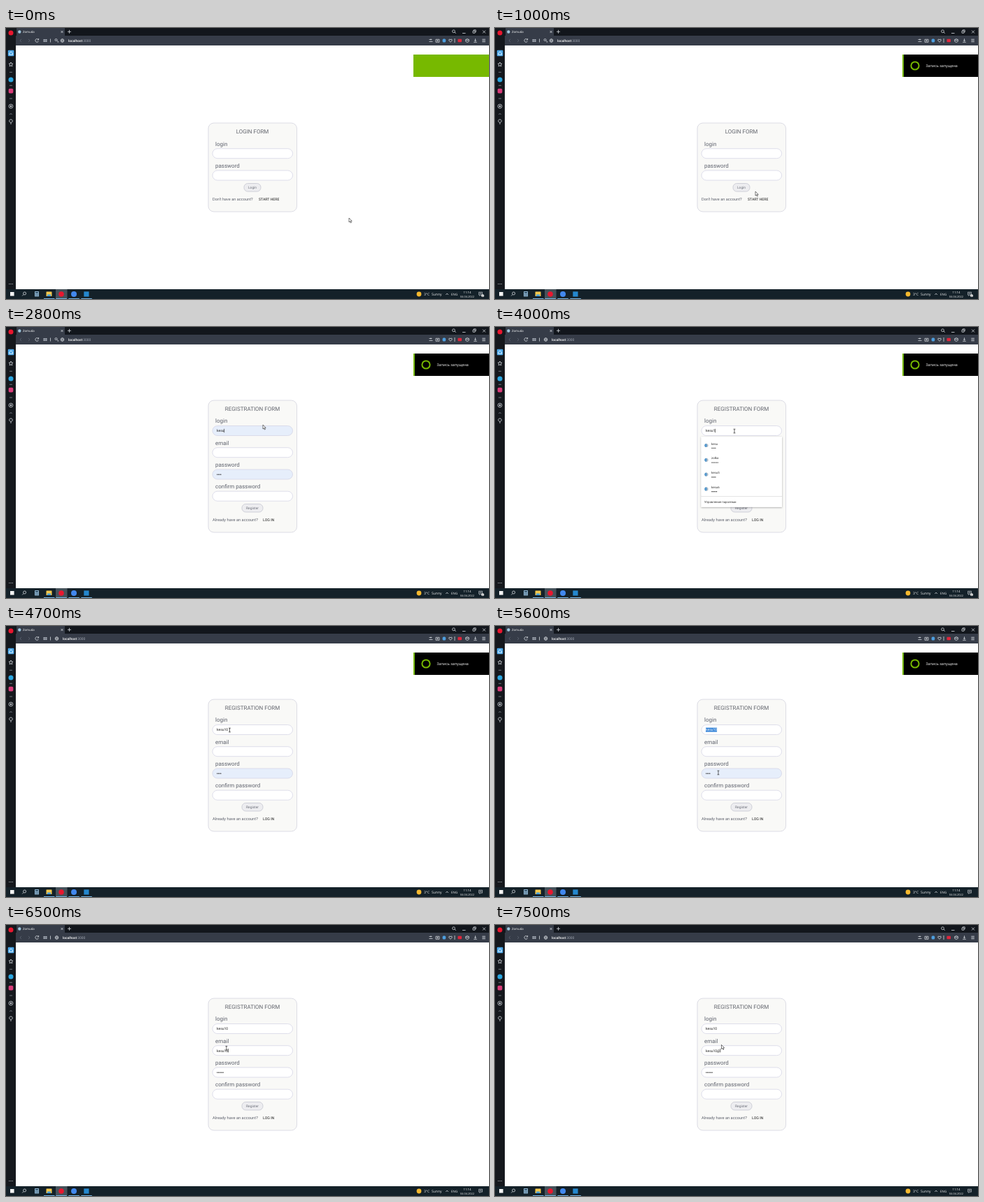
These frames come from a looping animation (690 by 388 pixels, 8000 ms). An HTML page:

```html
<!DOCTYPE html>
<html lang="en">
<head>
<meta charset="utf-8">
<title>Registration walkthrough</title>
<style>
  html, body { margin: 0; width: 100%; height: 100%; overflow: hidden; background: #fff; }
  svg { display: block; width: 690px; height: 388px; }
  text { font-family: Roboto, Arial, sans-serif; text-rendering: geometricPrecision; white-space: pre; }
  .ui { font-family: "Open Sans", "Noto Sans", sans-serif; }
  .line { fill: none; stroke: #d4d8de; stroke-width: .8; }
</style>
</head>
<body>
<svg id="stage" viewBox="0 0 690 388"></svg>
<script>
const LOOP = 8000;
const USER = 'kesu';
const FIELD = { login: 141.5, email: 172.7, password: 204, confirm: 235.2 };

const rect = (x, y, w, h, fill, more = '') =>
  `<rect x="${x}" y="${y}" width="${w}" height="${h}" fill="${fill}" ${more}/>`;
const disc = (x, y, r, fill, more = '') => `<circle cx="${x}" cy="${y}" r="${r}" fill="${fill}" ${more}/>`;
const line = (d, more = '') => `<path class="line" d="${d}" ${more}/>`;
const text = (x, y, size, str, fill = '#5f636e', more = '') =>
  `<text x="${x}" y="${y}" font-size="${size}" fill="${fill}" ${more}>${str}</text>`;
const mid = 'text-anchor="middle"';
const group = (id, body) => `<g id="${id}">${body}</g>`;
const dots = (x, y, n, step = 1.7) =>
  Array.from({ length: n }, (_, i) => disc(x + .8 + i * step, y, .66, '#222')).join('');

const label = (y, str) => text(299, y - 4.2, 8, str);
const input = (y, id = '') =>
  rect(295, y, 114.5, 14, '#fff', `${id && `id="${id}"`} rx="7" stroke="#d2d2e4" stroke-width=".7"`);
const card = (y, h, title) =>
  rect(289, y, 126.5, h, '#f9f9f7', 'rx="8" stroke="#d3d3df" stroke-width=".8"') +
  text(352, y + 15, 8, title, '#63666e', mid);
const button = (y, w, str) =>
  rect(352 - w / 2, y, w, 11.6, '#ededf0', 'rx="5.5" stroke="#bfc0cc" stroke-width=".7"') +
  text(352, y + 7.5, 4.9, str, '#6b6e78', mid);

function browser() {
  return rect(0, 0, 690, 11, '#12161c') + rect(14, 11, 676, 14, '#363c48') +
    rect(0, 0, 14, 374, '#15181d') + rect(15, 0, 69, 12, '#363c48') +
    // tab strip and window buttons
    disc(7, 7, 3.5, '#e8172f') + disc(19.3, 5.5, 2.2, '#9cc6dd') +
    text(24, 7.2, 4.3, 'Zomuda', '#fff', 'class="ui"') +
    line('M78.5 4l3 3m0-3l-3 3M88 5.3h5m-2.5-2.5v5M652 7.5h4.5M667 4.2h3v3h-3zM668.2 4v-1.2h3v3h-1M681 3.5l4 4m0-4l-4 4M641 6l1.8 1.8') +
    disc(639.5, 4.7, 1.9, 'none', 'class="line"') +
    // navigation
    line('M22 15.8l-2 2.2 2 2.2M32 15.8l2 2.2-2 2.2', 'style="stroke:#5f6673"') +
    line('M46.3 16.6a2.4 2.4 0 1 0 .2 2.2M46.6 15v2h-2M63.5 15.5v5') +
    rect(53.5, 16, 5, 4, '#a9afb9') + line('M53.5 18h5M56 16v4', 'style="stroke:#363c48;stroke-width:.5"') +
    group('key', disc(71.5, 17, 1.5, 'none', 'class="line"') + line('M72.6 18l2.4 2.3m-1 .3l1-1')) +
    group('address', disc(80.5, 18, 2.3, 'none', 'class="line"') +
      line('M78.2 18h4.6M80.5 15.7q-2 2.3 0 4.6q2-2.3 0-4.6', 'style="stroke-width:.5"') +
      text(89, 19.7, 4.9, 'localhost<tspan fill="#a3a9b4" font-weight="400">:3000</tspan>', '#fff', 'font-weight="500"')) +
    // toolbar icons
    line('M604.5 16.5h4m-4 3h5m-2.5-4v2M614 16.3h5v4h-5zM641 15v6') + disc(616.5, 18.3, 1, '#d4d8de') +
    rect(623.6, 15.6, 4.6, 4.8, '#4d9fe0', 'rx="1.5"') +
    line('M635 20.3l-2.2-2.3q-.4-2 1.2-2l1 .9 1-.9q1.6 0 1.2 2z') +
    rect(645.5, 15.7, 5.5, 4.6, '#e0263c', 'rx="1"') +
    line('M659 15.5l2.3 1.2v2.6l-2.3 1.2-2.3-1.2v-2.6zm-2.3 1.2l2.3 1.2 2.3-1.2M670.5 15.3v3.5m-1.5-1.3l1.5 1.4 1.5-1.4M668.2 20.3h4.6M680.3 16.2h4.5m-4.5 1.8h4.5m-4.5 1.8h4.5') +
    // side panel
    rect(2.8, 31.7, 8.6, 8.6, '#4aa5e6', 'rx="1"') + line('M4.8 36l2.3-2.2 2.3 2.2v2.3h-4.6z', 'style="stroke:#fff"') +
    line('M7 49l.9 2 2.1.2-1.6 1.5.5 2.2-1.9-1.1-1.9 1.1.5-2.2L4 51.2l2.1-.2z') +
    line('M5 63.3h4M5 82.3h4M5 101h4M5.2 123.6l1.8-1 1.8 1', 'style="stroke:#858b94"') +
    disc(7, 74, 3.5, '#2aa5df') + rect(3.7, 86.8, 6.6, 6.6, '#d83b78', 'rx="1.6"') +
    disc(7, 112, 2.9, 'none', 'class="line"') + disc(7, 112, 1.2, '#d4d8de') +
    line('M6 135.3q-1.6-1.2-1.3-2.6.5-1.8 2.3-1.8t2.3 1.8q.3 1.4-1.3 2.6zM6 137h2') +
    [4.8, 7, 9.2].map(x => disc(x, 366.5, .6, '#d4d8de')).join('');
}

function taskbar() {
  const w = '#f4f4f4', ui = 'class="ui"';
  return rect(0, 374, 690, 14, '#142129') + rect(71, 374, 16.5, 14, '#46525a') +
    rect(6, 378, 5.6, 5.6, w) +
    disc(26.6, 380, 2, 'none', 'class="line"') + line('M25.2 381.5l-2 2') +
    rect(41, 377, 6, 7.6, '#8fb5d0', 'rx=".6"') + rect(42, 378, 4, 1.6, '#26455b') +
    line('M42 381.3h4m-4 1.8h4', 'style="stroke:#26455b;stroke-dasharray:1 .5"') +
    rect(57.5, 377.4, 8, 6.7, '#f3c84c', 'rx=".5"') + rect(59, 381.5, 5, 2.6, '#4aa1dc') +
    disc(79, 381, 3.8, '#e8172f') + disc(97, 381, 4, '#4288ee') + rect(111.3, 377.4, 7.2, 7.2, '#2488cf') +
    [54, 71.3, 89.3, 107.3].map(x => rect(x, 387, 15.5, 1, '#76b4e3')).join('') +
    disc(590, 381, 3.4, '#f5b82e') +
    text(597, 383, 5, '3°C', w, ui) + text(608, 383, 5, 'Sunny', w, ui) +
    line('M628.3 382l1.8-1.9 1.8 1.9') + text(636, 382.8, 4.5, 'ENG', w, ui) +
    text(659, 379.5, 4.3, '11:14', w, ui + mid) + text(659, 386, 3.9, '04.04.2022', w, ui + mid) +
    line('M675.5 378.2h5v4h-2.5l-1.2 1.3v-1.3h-1.3zM676.5 379.6h3m-3 1.3h3', 'style="stroke-width:.6"') +
    group('badge', disc(681, 383.2, 2, '#eee') + text(681, 384.6, 3.4, '2', '#222', mid));
}

function popup() {
  const rows = [[USER, 4], ['zolka', 6], [USER + '5', 4], [USER + '6', 5]];
  return rect(294.5, 157, 115.5, 100.8, '#fff', 'filter="url(#shade)"') +
    rows.map(([name, n], i) => {
      const y = 169.5 + i * 20.8;
      return disc(302, y, 2.6, '#b4bfc9') +
        `<path d="M302 ${y - 2.6}a2.6 2.6 0 0 0 0 5.2q1.8-2.6 0-5.2" fill="#5599cf"/>` +
        text(309, y - 1, 4.4, name, '#333') + dots(309, y + 3.8, n);
    }).join('') +
    rect(294.5, 242.2, 115.5, .6, '#d2d2d2') + text(299, 251.8, 4.3, 'Управление паролями', '#333');
}

document.getElementById('stage').innerHTML =
  `<filter id="shade" x="-10%" y="-10%" width="120%" height="125%">
     <feDropShadow dx="0" dy=".8" stdDeviation="1" flood-opacity=".35"/></filter>` +
  rect(0, 0, 690, 388, '#fff') + browser() + taskbar() +
  group('signIn', card(136, 127, 'LOGIN FORM') + label(172.7, 'login') + input(172.7) +
    label(204, 'password') + input(204) + button(222.5, 24, 'Login') +
    text(295, 247.2, 5.65, "Don't have an account?") +
    rect(355, 237.5, 42, 16, '#000', 'id="hover" rx="1.5" fill-opacity=".045"') +
    text(361, 247.2, 5.2, 'START HERE', '#1d1d1d')) +
  group('signUp', card(105, 189, 'REGISTRATION FORM') +
    label(FIELD.login, 'login') + label(FIELD.email, 'email') +
    label(FIELD.password, 'password') + label(FIELD.confirm, 'confirm password') +
    input(FIELD.login, 'loginBox') + input(FIELD.email) +
    input(FIELD.password, 'passBox') + input(FIELD.confirm) +
    button(253.4, 30, 'Register') +
    text(295, 278.2, 5.72, 'Already have an account?') + text(367, 278.2, 5.25, 'LOG IN', '#1d1d1d') +
    rect(301, 145.6, 0, 6, '#3584d8', 'id="selection"') +
    text(301, 150.3, 5, '', '#222', 'id="loginText"') + text(301, 181.5, 5, '', '#222', 'id="emailText"') +
    dots(301, 211.2, 4) + group('moreDots', dots(307.8, 211.2, 2)) +
    group('popup', popup()) + rect(0, 0, .6, 5.4, '#111', 'id="caret"')) +
  rect(0, 38, 108, 32, '#77b900', 'id="green"') +
  group('black', rect(584, 38, 106, 32, '#000') +
    disc(600, 54, 5.6, 'none', 'stroke="#77b900" stroke-width="2"') +
    text(615.5, 56.2, 5.4, 'Запись запущена', '#fff', 'class="ui" style="font-size:5.3px"')) +
  group('pointer',
    '<path id="arrow" d="M0 0v6l1.4-1.2 1 2.2 1-.4-1-2.2h1.8z" fill="#fff" stroke="#222" stroke-width=".6"/>' +
    '<path id="beam" d="M-1.4-2.8h2.8M0-2.8v5.6M-1.4 2.8h2.8" fill="none" stroke="#222" stroke-width=".7"/>' +
    '<path id="hand" d="M-.6 0v3.6l-1-.7-.7.7 2 2.9h3.2l.8-3.6-2.9-1V0z" fill="#fff" stroke="#222" stroke-width=".6"/>');

const $ = id => document.getElementById(id);
const show = (id, on) => { $(id).style.display = on ? '' : 'none'; };
const move = (id, x, y = 0) => $(id).setAttribute('transform', `translate(${x} ${y})`);
const within = (t, a, b) => t >= a && t < b;
const ramp = (t, a, b) => Math.min(1, Math.max(0, (t - a) / (b - a)));

// time, x, y of the pointer
const PATH = [
  [200, 490, 272], [1000, 372, 234], [1400, 376, 243], [2000, 376, 243], [2300, 450, 205],
  [2600, 410, 150], [2800, 367, 140], [2900, 347, 147], [3200, 342, 149], [4600, 342, 149],
  [5000, 252, 149], [5100, 252, 150], [5500, 319, 208], [5600, 319, 210], [5800, 319, 210],
  [6000, 304, 191], [6300, 312, 178], [6400, 312, 178], [6800, 323.5, 171.5]
];
function pointerAt(t) {
  const i = PATH.findIndex(p => p[0] > t);
  if (i < 0) return PATH[PATH.length - 1].slice(1);
  if (!i) return PATH[0].slice(1);
  const a = PATH[i - 1], b = PATH[i], k = ramp(t, a[0], b[0]);
  return [a[1] + (b[1] - a[1]) * k, a[2] + (b[2] - a[2]) * k];
}

function drawPointer(t, x, y) {
  const fields = t < 1800 ? [FIELD.email, FIELD.password] : Object.values(FIELD);
  const dragging = within(t, 4700, 5100);
  const beam = dragging || x > 295 && x < 410 && fields.some(f => y > f && y < f + 14);
  const hand = within(t, 1200, 1800);
  move('pointer', x, y);
  show('beam', beam && !hand);
  show('hand', hand);
  show('arrow', !beam && !hand);
}

function drawForm(t, x) {
  show('signIn', t < 1800);
  show('signUp', t >= 1800);
  show('hover', within(t, 1200, 1800));

  const edited = t >= 4000, pasted = t >= 5800;
  const tint = on => on ? '#e6eefb' : '#fff';
  $('loginBox').setAttribute('fill', tint(!edited));
  $('passBox').setAttribute('fill', tint(!pasted));
  show('key', !edited);
  move('address', edited ? -8 : 0);
  show('badge', t < 4400);

  const login = $('loginText'), email = $('emailText');
  login.textContent = USER + (t >= 4400 ? '10' : edited ? '1' : '');
  email.textContent = t < 6500 ? '' : USER + (t < 7500 ? '10' : '10@');
  const end = node => 301 + (node.textContent && node.getComputedTextLength());

  const selected = within(t, 4700, 5700);
  const right = end(login), left = t < 5000 ? Math.min(right, Math.max(301, x)) : 301;
  $('selection').setAttribute('x', left);
  $('selection').setAttribute('width', selected ? right - left : 0);
  login.setAttribute('fill', selected && left < 309 ? '#fff' : '#222');

  show('moreDots', pasted);
  show('popup', within(t, 3400, 4200) || within(t, 5700, 6200));
  move('popup', 0, t < 5000 ? 0 : 62.5);

  const caretOn = within(t, 2700, 3200) || within(t, 3700, 4700) ||
    within(t, 5700, 7000) || t >= 7500;
  show('caret', caretOn);
  if (t < 5700) move('caret', right, 145.8);
  else if (t < 6300) move('caret', pasted ? 311.5 : 308, 208.3);
  else move('caret', end(email), 177);
}

function drawBanner(t) {
  const hidden = t < 3000 ? 1 - ramp(t, 0, 400) : ramp(t, 5600, 5900);
  move('black', 106 * hidden ** 2);
  move('green', 582 + 108 * ramp(t, 5900, 6300) ** 1.3);
}

function frame(now) {
  const t = Math.floor(now % LOOP / 100) * 100;
  const [x, y] = pointerAt(t);
  drawForm(t, x);
  drawBanner(t);
  drawPointer(t, x, y);
  requestAnimationFrame(frame);
}
frame(performance.now());
</script>
</body>
</html>
```
